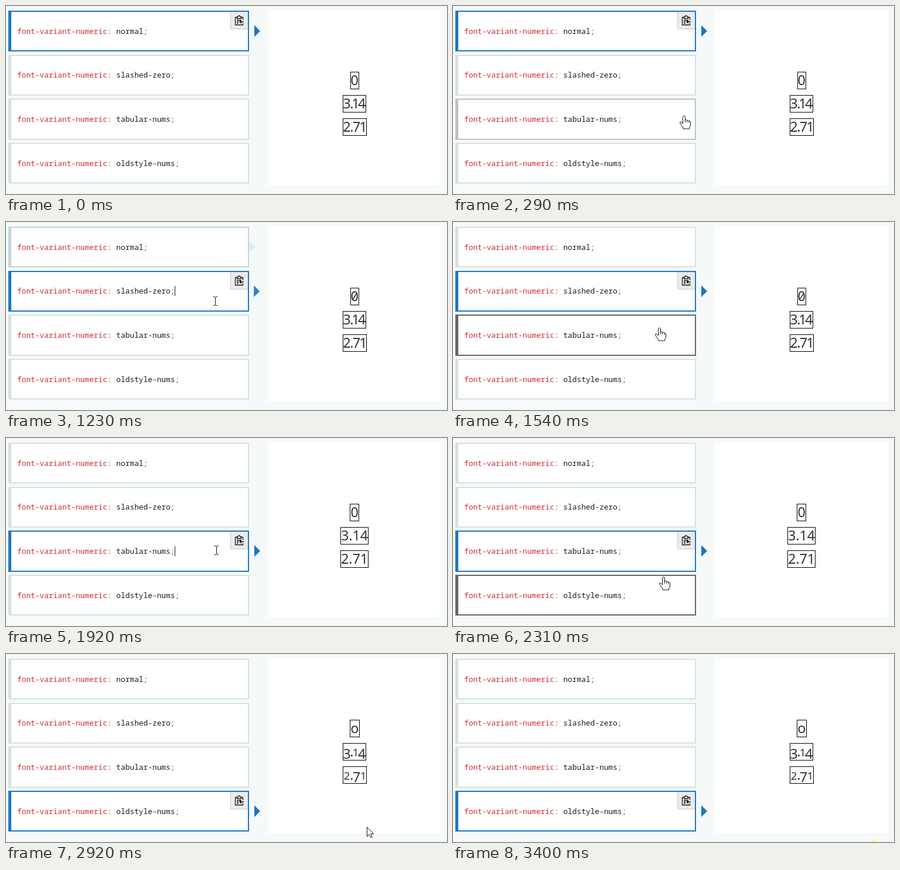
These frames come from a looping animation (753x323 px, 3.47 s). An HTML page with a canvas:

```html
<!DOCTYPE html>
<html lang="en">
<head>
<meta charset="utf-8">
<title>font-variant-numeric</title>
<style>
html, body { margin: 0; width: 100%; height: 100%; overflow: hidden; background: #f5f9fa; }
canvas { display: block; }
</style>
</head>
<body>
<canvas id="stage" width="753" height="323"></canvas>
<script>
const ctx = document.getElementById('stage').getContext('2d');
const LOOP = 3470, FADE = 200;
const LIGHT = [216, 224, 222], GREY = [102, 102, 102], BLUE = [27, 118, 196];
const CODE = '12.83px "Noto Sans Mono", "DejaVu Sans Mono", monospace';
const values = ['normal', 'slashed-zero', 'tabular-nums', 'oldstyle-nums'];

// The picture only changes at these moments, like a screen recording.
const ticks = [0, 70, 150, 220, 300, 370, 440, 610, 680, 760, 840, 910, 990,
  1140, 1230, 1310, 1390, 1460, 1540, 1690, 1760, 1840, 1920, 2000, 2070, 2150,
  2230, 2310, 2540, 2610, 2690, 2770, 2840, 2920, 3000, 3080, 3150, 3400];

const clicks = [-1000, 1050, 1700, 2540];                 // when each option is chosen
const hovers = [[2, 170, 300], [1, 540, 1050], [2, 1340, 1700], [3, 2110, 2540]];
const carets = [[1, 1140, 1460], [2, 1760, 2230]];

// Pointer track: time, x, y, shape used from then on.
const track = [
  [70, 452, 225, 'arrow'], [220, 394, 188, 'hand'], [300, 368, 167, 'hand'],
  [370, 357, 157, 'arrow'], [440, 355, 157, 'arrow'], [610, 355, 152, 'hand'],
  [680, 355, 145, 'hand'], [990, 357, 134, 'hand'], [1140, 357, 134, 'beam'],
  [1310, 357, 137, 'beam'], [1390, 355, 162, 'hand'], [1540, 352, 181, 'hand'],
  [1690, 357, 190, 'hand'], [1760, 359, 193, 'beam'], [1920, 359, 193, 'beam'],
  [2070, 359, 224, 'hand'], [2150, 359, 236, 'hand'], [2310, 359, 238, 'hand'],
  [2540, 359, 239, 'beam'], [2610, 359, 239, 'beam'], [2690, 390, 249, 'arrow'],
  [2840, 545, 283, 'arrow'], [3000, 687, 310, 'arrow'], [3080, 687, 314, 'arrow'],
  [3150, 700, 330, 'arrow']
];

const shapes = {
  arrow: new Path2D('M.5 .5V16.5L4.3 13L7 18.5L9.3 17.5L6.8 12H11.8Z'),
  hand: new Path2D('M-1.5 2Q.5 -1 2.5 2V8Q4.5 6.5 5.7 8.5Q8 7.5 9 10Q11 9 11.5 11.5V16Q11.5 19 9.5 21V23H-1V21L-6 14Q-7.5 11 -5 11L-1.5 14Z'),
  beam: new Path2D('M-3 -7.5H-1M2 -7.5H4M-3 7.5H-1M2 7.5H4M-1 -7.5L.5 -6.5L2 -7.5M-1 7.5L.5 6.5L2 7.5M.5 -6.5V6.5')
};

const clamp = v => Math.max(0, Math.min(1, v));
const rgb = (a, b, k) => `rgb(${a.map((v, i) => Math.round(v + (b[i] - v) * k))})`;

function rect(color, x, y, w, h) {
  ctx.fillStyle = color;
  ctx.fillRect(x, y, w, h);
}

function text(s, x, y, color) {
  ctx.fillStyle = color;
  ctx.fillText(s, x, y);
}

function stroke(path, color, width = 1) {
  ctx.strokeStyle = color;
  ctx.lineWidth = width;
  ctx.stroke(path);
}

const active = t => clicks.findLastIndex(c => t >= c);

// How strongly an option is marked as chosen, 0 to 1.
function chosen(i, t) {
  const now = active(t), p = clamp((t - clicks[now]) / FADE);
  return i === now ? p : i === now - 1 ? 1 - p : 0;
}

function hovered(i, t) {
  let k = 0;
  for (const [box, from, to] of hovers) {
    if (box !== i || t < from) continue;
    const peak = clamp((Math.min(t, to) - from) / FADE);
    k = t <= to ? peak : peak * clamp(1 - (t - to) / 140);
  }
  return k;
}

const icon = new Path2D('M11 9.5H8.5V22.5H21.5V19.5M18 9.5H21.5V14M11.5 11.5V8.5H13Q15 4.5 17 8.5H18.5V11.5ZM11 14.5H18M11 17H14M11 19.5H14M23 17H16');
const iconHead = new Path2D('M15 17L19 13.5V20.5Z');

function copyButton(y) {
  rect('#ccc', 383, y, 30, 30);
  rect('#ebebeb', 384, y, 29, 29);
  ctx.save();
  ctx.translate(383, y);
  stroke(icon, '#1b1b1b', 1.3);
  ctx.fillStyle = '#1b1b1b';
  ctx.fill(iconHead);
  ctx.restore();
}

function option(i, t) {
  const shift = 75.67 * i, y = Math.round(8 + shift), h = i === 2 ? 71 : 70;
  const on = i === active(t), k = chosen(i, t);
  const border = on ? rgb(BLUE, BLUE, 0)
    : k > 0 ? rgb(LIGHT, BLUE, k) : rgb(LIGHT, GREY, hovered(i, t));
  rect(border, 4, y, 411, h);
  rect('#fff', 9, y + 2, 404, h - 4);
  if (on) copyButton(y + 2);

  ctx.font = CODE;
  ctx.textAlign = 'left';
  const base = Math.round(47.7 + shift), step = 7.698;
  const column = n => 19 + n * step;
  text('font-variant-numeric', column(0), base, '#d02a30');
  text(':', column(20), base, '#5f6364');
  text(values[i], column(22), base, '#1b1b1b');
  text(';', column(22 + values[i].length), base, '#5f6364');
  if (carets.some(([box, from, to]) => box === i && t >= from && t < to)) {
    rect('#1b1b1b', 288, base - 13, 1, 17);
  }

  if (k > 0) {
    const x = 415 + 9 * k, mid = Math.round(43 + shift);
    ctx.globalAlpha = k;
    ctx.fillStyle = rgb(BLUE, BLUE, 0);
    ctx.fill(new Path2D(`M${x} ${mid - 10}L${x + 10} ${mid}L${x} ${mid + 10}Z`));
    ctx.globalAlpha = 1;
  }
}

function digit(c, x, y, oldstyle) {
  const small = oldstyle && '012'.includes(c);
  const low = oldstyle && '347'.includes(c);
  const size = small && c !== '0' ? 18.5 : 23.5;
  ctx.font = `${size}px "Noto Sans", "Open Sans", sans-serif`;
  text(small && c === '0' ? 'o' : c, x, y + (low ? 4 : 0), '#333');
}

function number(s, centers, left, right, row, mode) {
  const top = 113 + 40 * row;
  [...s].forEach((c, i) => digit(c, centers[i], top + 23, mode === 3));
  ctx.strokeStyle = '#000';
  ctx.lineWidth = 1;
  ctx.strokeRect(left + .5, top + .5, right - left - 1, 29);
}

function output(mode) {
  rect('#fff', 447, 8, 296, 300);
  ctx.textAlign = 'center';
  const tabular = mode === 2;
  number('0', [595.3], mode < 2 ? 588 : 587, mode === 3 ? 604 : 603, 0, mode);
  if (mode === 1) stroke(new Path2D('M591.5 134L599 122'), '#333', 1.5);
  const even = [578.7, 588.5, 598.3, 611.5];
  number('3.14', tabular ? even : [582, 590.3, 597, 607.7],
    tabular ? 571 : 575, tabular ? 619 : 615, 1, mode);
  number('2.71', tabular ? even : [582, 590.3, 598.5, 610],
    tabular ? 571 : 575, tabular ? 619 : 616, 2, mode);
}

function pointer(t) {
  const n = track.findLastIndex(k => t >= k[0]);
  if (n < 0) return;
  const [t0, x0, y0, shape] = track[n];
  const [t1, x1, y1] = track[n + 1] || [t0 + 1, x0, y0];
  const k = clamp((t - t0) / (t1 - t0));
  ctx.save();
  ctx.translate(Math.round(x0 + (x1 - x0) * k), Math.round(y0 + (y1 - y0) * k));
  if (shape === 'beam') {
    stroke(shapes.beam, '#111');
  } else {
    ctx.fillStyle = '#fff';
    ctx.fill(shapes[shape]);
    stroke(shapes[shape], '#111');
    if (shape === 'hand') stroke(new Path2D('M2.5 8V12M5.7 8.5V12M9 10V12.5'), '#111');
  }
  ctx.restore();
}

function draw(now) {
  const t = ticks.findLast(v => v <= now % LOOP);
  rect('#f5f9fa', 0, 0, 753, 323);
  values.forEach((_, i) => option(i, t));
  output(active(t));
  pointer(t);
  if (t >= 3400) {
    ctx.fillStyle = '#fff95c';
    ctx.beginPath();
    ctx.arc(720, 331.5, 11, 0, 2 * Math.PI);
    ctx.fill();
  }
}

const start = performance.now();
function frame() {
  draw(performance.now() - start);
  requestAnimationFrame(frame);
}
frame();
</script>
</body>
</html>
```
